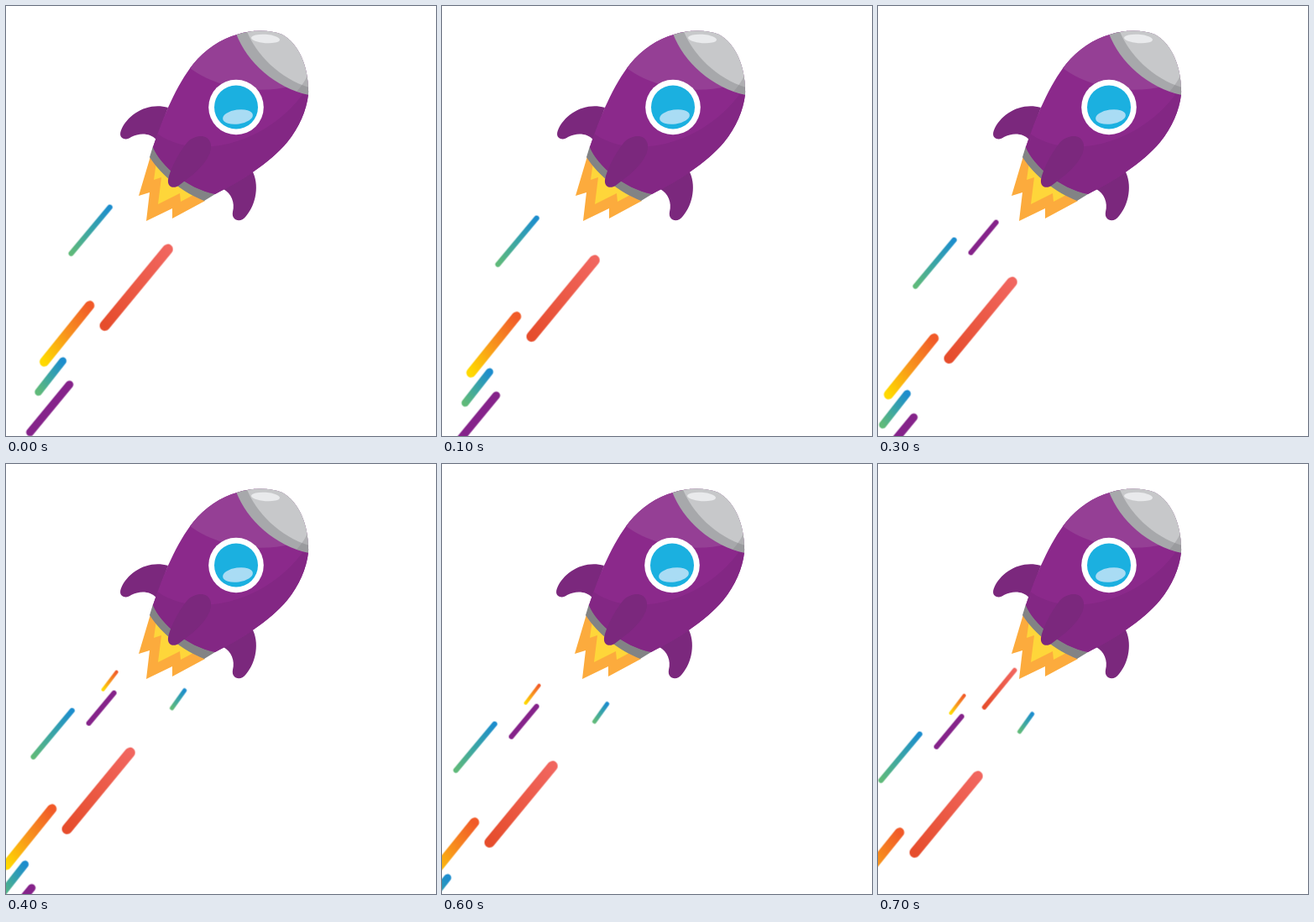
An HTML page that plays this animation: 512x512 px, repeating every 0.8 s.

```html
<!DOCTYPE html>
<html lang="en">
<head>
<meta charset="utf-8">
<title>Rocket</title>
<style>
  html, body { margin: 0; width: 100%; height: 100%; overflow: hidden; background: #fff; }
  svg { display: block; width: 100vw; height: 100vh; }

  #rocket { animation: shake 200ms step-end infinite; }
  #trails { animation: fall 800ms step-end infinite; stroke-linecap: round; }
  .at200 { animation: show200 800ms step-end infinite; }
  .at400 { animation: show400 800ms step-end infinite; }
  .at700 { animation: show700 800ms step-end infinite; }

  @keyframes shake { 0% { transform: none; } 50%, 100% { transform: translate(1px, 0); } }
  @keyframes fall {
    0% { transform: translate(0, 0); }
    12.5% { transform: translate(-11px, 13px); }
    25% { transform: translate(-22px, 26px); }
    37.5% { transform: translate(-33px, 39px); }
    50% { transform: translate(-45px, 54px); }
    62.5% { transform: translate(-53px, 62px); }
    75% { transform: translate(-61px, 70px); }
    87.5%, 100% { transform: translate(-74px, 82px); }
  }
  @keyframes show200 { 0% { opacity: 0; } 25%, 100% { opacity: 1; } }
  @keyframes show400 { 0% { opacity: 0; } 50%, 100% { opacity: 1; } }
  @keyframes show700 { 0% { opacity: 0; } 87.5%, 100% { opacity: 1; } }
</style>
</head>
<body>
<svg viewBox="0 0 512 512">
  <defs>
    <linearGradient id="cool" x1="1" y1="0" x2="0" y2="1">
      <stop offset="0" stop-color="#1c8dce"/><stop offset=".5" stop-color="#3aa5a6"/><stop offset="1" stop-color="#60ba7a"/>
    </linearGradient>
    <linearGradient id="red" x1="1" y1="0" x2="0" y2="1">
      <stop offset="0" stop-color="#f1665f"/><stop offset="1" stop-color="#e64d2c"/>
    </linearGradient>
    <linearGradient id="warm" x1="1" y1="0" x2="0" y2="1">
      <stop offset="0" stop-color="#f15a29"/><stop offset=".5" stop-color="#f8931d"/><stop offset="1" stop-color="#ffd900"/>
    </linearGradient>
    <clipPath id="hull">
      <path id="body" d="M275 34C256 39 237 52 223 69C203 94 187 132 175 168C184 190 215 217 249 224C279 209 314 187 335 162C349 145 358 124 360 105C361 73 349 45 329 34C315 28 292 28 275 34Z"/>
    </clipPath>
  </defs>

  <g id="trails">
    <g transform="translate(.6 .6)">
      <path d="M123 239L77 294" stroke="url(#cool)" stroke-width="6.3"/>
      <path d="M192 289L117 380" stroke="url(#red)" stroke-width="12.3"/>
      <path d="M99 356L45 423" stroke="url(#warm)" stroke-width="11.3"/>
      <path d="M67 422L38 459" stroke="url(#cool)" stroke-width="8.8"/>
      <path d="M75 450L28 507" stroke="#85238a" stroke-width="9.2"/>
      <path class="at200" d="M173 218L143 254" stroke="#85238a" stroke-width="6"/>
      <path class="at400" d="M176 193L160 214" stroke="url(#warm)" stroke-width="4"/>
      <path class="at400" d="M257 215L242 236" stroke="url(#cool)" stroke-width="5"/>
      <path class="at700" d="M236 163L200 207" stroke="url(#red)" stroke-width="5.5"/>
    </g>
  </g>

  <g id="rocket">
    <path fill="#fcab3d" d="M172 179L158 226L171 222L167 256L198 241L198 253L237 232Z"/>
    <path fill="#fed63a" d="M179 186L176 207L185 204L181 236L207 223L208 233L223 225Z"/>
    <g fill="#7b287d">
      <path d="M193 121C170 114 145 128 137 148C133 158 143 161 149 156C159 151 171 151 179 159Z"/>
      <path d="M293 196C302 212 298 236 286 250C280 259 268 256 270 245C273 234 268 223 259 218Z"/>
    </g>
    <path fill="#828385" d="M175 167C186 188 218 216 249 224L236 232C211 222 186 203 171 180Z"/>
    <use href="#body" fill="#8b298b"/>
    <g clip-path="url(#hull)">
      <path fill="#953f95" d="M200 40L290 20L340 95C300 106 252 98 219 74Z"/>
      <path fill="#832784" d="M170 142C191 168 236 174 275 161C316 148 345 120 360 95L380 150L270 240L165 190Z"/>
      <path fill="#a7a8ab" d="M274 33C287 67 321 98 361 106L380 20L280 10Z"/>
      <path fill="#c7c8ca" d="M286 28C297 57 325 86 361 97L380 20L290 10Z"/>
      <path fill="#808285" opacity=".35" d="M361 78C357 88 352 95 346 102L362 106Z"/>
    </g>
    <ellipse cx="309" cy="39" rx="17" ry="5.2" fill="#e9eaec" transform="rotate(4 309 39)"/>
    <path fill="#7b287d" d="M230 155C243 154 247 165 242 177C235 192 220 203 208 212C200 219 192 216 193 207C195 195 206 174 216 162C220 158 224 156 230 155Z"/>
    <circle cx="274" cy="120.5" r="32.8" fill="#fff"/>
    <circle cx="274" cy="120.5" r="26" fill="#1bb0e0"/>
    <ellipse cx="276" cy="132" rx="18" ry="8.5" fill="#a9dcf4" transform="rotate(-8 276 132)"/>
  </g>
</svg>
</body>
</html>
```
